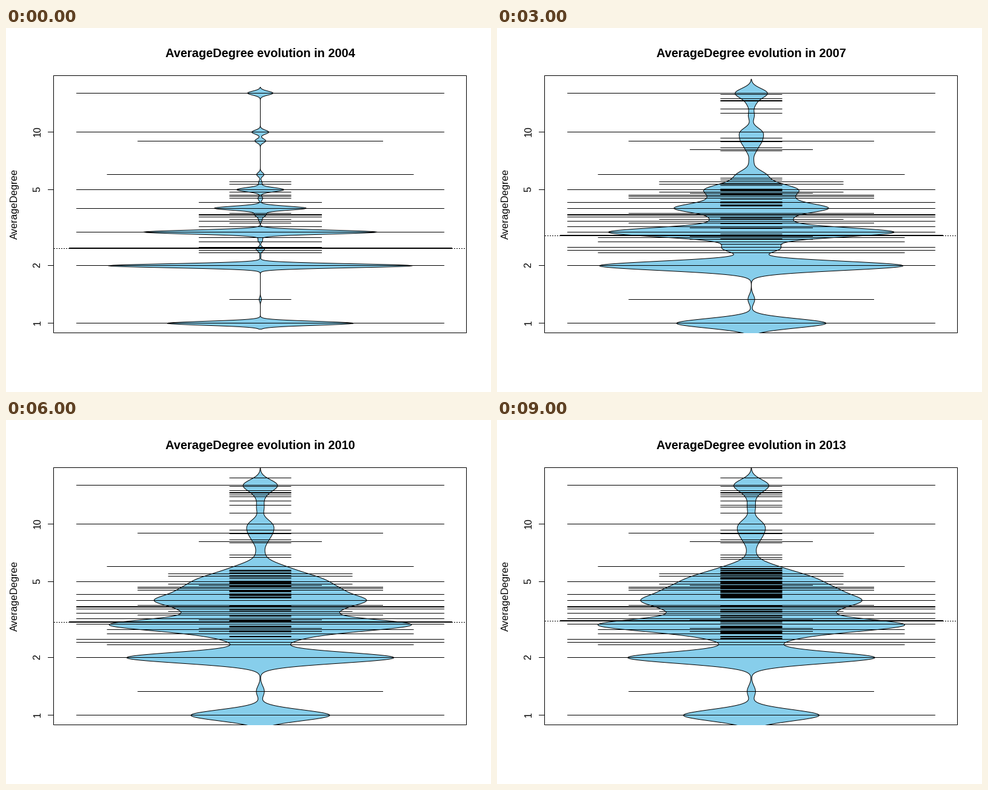
Recreate the animation shown at these times as a matplotlib script. Size 800 by 600 pixels, loop 10 s.

```python
import numpy as np
import matplotlib.pyplot as plt
from matplotlib.animation import FuncAnimation
from matplotlib.patches import Polygon, Rectangle

PX = 0.72                      # points per pixel at 100 dpi
MID = 419
LEFT, RIGHT, TOP, BOTTOM = 78, 759, 78, 502
SKY = "#87CEEB"

# Degrees seen in many, some or few cases, by the number of cases drawn
WHOLE = {6: (1, 2, 3, 4, 5, 10, 16), 5: (6,), 4: (9,)}
FRACTIONS = {6: (12/5, 5/2, 16/5, 24/7, 18/5, 11/3, 26/7, 30/7),
             5: (7/3, 8/3, 14/5),
             4: (4/3, 10/3, 15/4, 9/2, 23/5, 14/3),
             3: (7/2, 34/7, 16/3, 11/2),
             2: (11/4, 20/7, 19/6, 24/5, 81/10)}
# High single degrees in the order they turn up
RARE = (15.75, 15, 14.6, 14.5, 13.2, 12.6, 8.9, 8, 9.3, 8.3,
        17.5, 14.2, 6.9, 13.9, 6.7, 11.4, 6.55, 12.3)

# Half width of the bean at a degree: first year and final level
QUICK = {16: (21, 29), 14.2: (0, 13), 12.2: (0, 7), 10: (14, 21), 9: (9, 22),
         8.1: (0, 14), 3: (193, 253), 2.44: (7, 63), 4/3: (2, 7), 1: (154, 111)}
SLOW = {7: (0, 9), 6: (6, 47), 5.45: (3, 90), 5: (39, 120), 4.5: (4, 150),
        4: (76, 183), 3.7: (10, 160), 3.47: (3, 141), 2.72: (4, 164), 2.25: (1, 71)}

plt.rcParams["font.family"] = "Liberation Sans"


def height(degree):
    return 486.25 - 315.1 * np.log10(degree)


def row(degree):
    return int(round(height(degree)))


def ease(i, scale, power):
    return 1 - np.exp(-(i / scale) ** power)


def singles(n):
    """n scattered degrees, two thirds of them crowded above 4"""
    for k in range(1, n + 1):
        u = k * 0.618034 % 1
        if k % 3:
            yield 4.1 * (5.9 / 4.1) ** u ** 1.3
        else:
            yield 2.45 * (3.8 / 2.45) ** u


def bean_lines(i):
    counts = {}
    for count, degrees in WHOLE.items():
        for d in degrees:
            counts[row(d)] = count
    growth = min(1, 0.4 + 0.3 * i)
    for count, degrees in FRACTIONS.items():
        for d in degrees:
            counts.setdefault(row(d), int(count * growth))
    shown = max(0, 4 + 2 * i) if i > 1 else 0
    for d in (*RARE[:shown], *singles(9 * i)):
        counts.setdefault(row(d), 1)
    return {r: c for r, c in counts.items() if c}


def kernel(y, knots, bw):
    return np.exp(-0.5 * ((y[:, None] - knots) / bw) ** 2)


def outline(i, rows):
    quick, slow = ease(i, 2.4, 1), ease(i, 3.7, 2)
    half = {2: 251 - 48 * slow ** 6}
    for bumps, part in ((QUICK, quick), (SLOW, slow)):
        for d, (first, last) in bumps.items():
            half[d] = first + (last - first) * part
    bw = 3.3 + 6.2 * quick
    knots = height(np.array(list(half)))
    weights = np.linalg.solve(kernel(knots, knots, bw), list(half.values()))
    y = np.linspace(min(rows) - 3 * bw, max(rows) + 3 * bw, 512)
    x = np.maximum(kernel(y, knots, bw) @ weights, 0)
    return np.column_stack([np.r_[MID - x, MID + x[::-1]], np.r_[y, y[::-1]]])


fig = plt.figure(figsize=(8, 6), dpi=100, facecolor="white")
ax = fig.add_axes([0, 0, 1, 1])
ax.set_xlim(-0.5, 799.5)       # whole numbers are pixel centres
ax.set_ylim(599.5, -0.5)
ax.axis("off")


def line(x, y, width=1, **kw):
    return ax.plot(x, y, color="black", lw=width * PX, snap=False,
                   solid_capstyle="butt", dash_capstyle="butt", **kw)[0]


def upright(x, y, text, size):
    ax.text(x, y, text, size=size * PX, rotation=90, rotation_mode="anchor",
            ha="center", va="baseline")


ax.add_patch(Rectangle((LEFT, TOP), RIGHT - LEFT, BOTTOM - TOP, fill=False,
                       ec="black", lw=PX, snap=False, zorder=1))
for degree in (1, 2, 5, 10):
    y = row(degree)
    line([68.5, LEFT], [y, y])
    upright(56, y - 1, str(degree), 16)
upright(18, 290, "AverageDegree", 16.5)
title = ax.text(MID - 0.5, 47.5, "", size=20 * PX, weight="bold", ha="center", va="baseline")

bean = Polygon([[MID, TOP], [MID, BOTTOM], [MID, TOP]], fc=SKY, ec="black",
               lw=PX, snap=False, zorder=1.5)
ax.add_patch(bean)
bean.set_clip_path(Rectangle((LEFT - 0.5, TOP - 0.5), RIGHT - LEFT + 1, BOTTOM - TOP + 1,
                             transform=ax.transData))
strokes = line([], [])
mean_line = line([], [], 2)
dots = line([], [], linestyle=(0, (2, 2)))


def update(i):
    rows = bean_lines(i)
    title.set_text(f"AverageDegree evolution in {2004 + i}")
    bean.set_xy(outline(i, rows))
    xs, ys = [], []
    for r, count in rows.items():
        half = 50.5 * count + 0.5
        xs += [MID - half, MID + half, np.nan]
        ys += [r, r, np.nan]
    strokes.set_data(xs, ys)
    mean = round(363 - 32 * ease(i, 2.95, 1.45))
    mean_line.set_data([103.5, 735.5], [mean - 0.5] * 2)
    dots.set_data([LEFT + 0.5, RIGHT + 0.5], [mean, mean])
    return title, bean, strokes, mean_line, dots


anim = FuncAnimation(fig, update, frames=10, interval=1000, repeat=True,
                     repeat_delay=0, blit=False)
plt.show()
```
